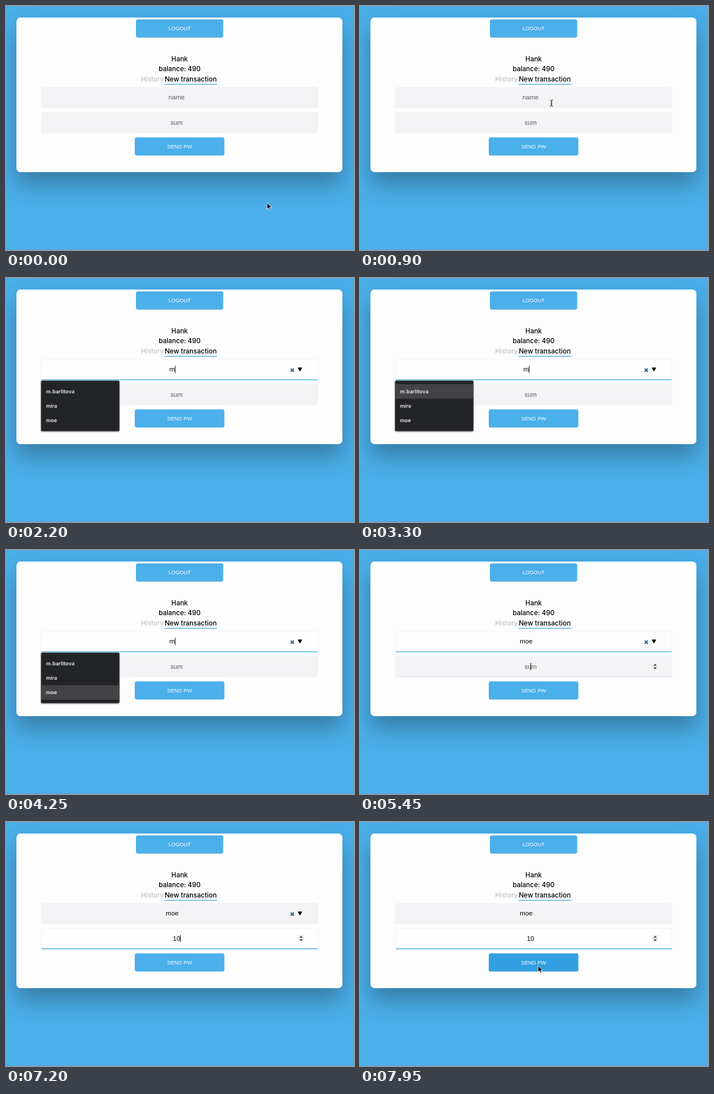
An HTML page for the animation above (8000 ms loop, 600 px wide and 423 px high).

```html
<!DOCTYPE html>
<html lang="en">
<head>
<meta charset="utf-8">
<title>New transaction</title>
<style>
  html, body { margin: 0; width: 100%; height: 100%; overflow: hidden; background: #4bafea; }
  #card {
    position: absolute; left: 18px; top: 20px; width: 562px; height: 267.5px;
    border-radius: 7px; background: #fefdfe; box-shadow: 0 21px 42px rgba(0, 0, 0, .3);
  }
  svg { position: absolute; left: 0; top: 0; }
  text { text-anchor: middle; }
  .head { font: 500 11.5px Poppins, Inter, sans-serif; }
  .field { font: 11.2px "Liberation Sans", Arial, sans-serif; }
  .btn { font: 9.2px "Liberation Sans", Arial, sans-serif; fill: #fff; }
  .item { font: 600 9px Inter, sans-serif; fill: #ececee; text-anchor: start; }
</style>
</head>
<body>
<div id="card"></div>
<svg width="600" height="423" viewBox="0 0 600 423">
  <rect x="224" y="23.3" width="150.5" height="31.5" rx="3.5" fill="#4bafea"/>
  <text class="btn" x="299.3" y="42.2">LOGOUT</text>

  <g class="head">
    <text x="299.3" y="95.5">Hank</text>
    <text x="299.3" y="113">balance: 490</text>
    <text x="272" y="131" style="text-anchor:end;font-weight:400" fill="#bbb9bd">History</text>
    <text x="318.5" y="131">New transaction</text>
  </g>
  <rect x="272.7" y="135" width="91.5" height="1.4" fill="#4bafea"/>

  <g id="name" class="field">
    <rect x="61" y="141" width="476.8" height="36" rx="3.5" stroke="#f2f1f3"/>
    <rect x="61.5" y="175.8" width="476" height="1.5" rx=".7" fill="#4bafea"/>
    <text y="162.3"></text>
    <g class="tools">
      <path d="M490.8 157l5.4 5.6m0-5.6l-5.4 5.6" stroke="#2f628f" stroke-width="2.1"/>
      <path d="M502.8 155.2h8l-4 7z"/>
    </g>
  </g>

  <g id="sum" class="field">
    <rect x="61" y="184.3" width="476.8" height="36" rx="3.5" stroke="#f2f1f3"/>
    <rect x="61.5" y="219.1" width="476" height="1.5" rx=".7" fill="#4bafea"/>
    <text y="206"></text>
    <g class="tools">
      <rect x="503.5" y="195.7" width="10.5" height="12.6" rx="2" fill="#ededee"/>
      <path d="M506 200.6h5.6l-2.8-3.2zM506 203.4h5.6l-2.8 3.2z" fill="#333"/>
    </g>
  </g>

  <rect id="send" x="222" y="227.7" width="154.5" height="31.6" rx="3.5"/>
  <text class="btn" x="299.3" y="246.6">SEND PW</text>

  <rect id="caret" width="1" height="12.5"/>
  <g id="list"></g>

  <g id="mouse">
    <path id="arrow" d="M0 0V11.3L2.6 8.9L4.4 12.9L6.2 12.1L4.5 8.3H8Z" stroke="#fff" stroke-width=".9"/>
    <path id="beam" d="M-2.5-5.5Q0-5.5 0-4V4Q0 5.5-2.5 5.5M2.5-5.5Q0-5.5 0-4V4Q0 5.5 2.5 5.5M-1.2 1.5h2.4" fill="none" stroke="#222" stroke-width="1"/>
  </g>
</svg>
<script>
const LOOP = 8000, CLICK = 1030, OPEN = 1150, TYPE = 2050, PICK = 4350, TAB = 5330,
      ONE = 6750, TEN = 7000, LEAVE = 7480;
const ALL = ['samuelpod', 'tina', 'Руслан', 'boris', 'moe', 'zortia'];
const MATCHES = ['m.barlitova', 'mira', 'moe'];
const ROW = 25.2;

const $ = id => document.getElementById(id);
const clamp = v => v < 0 ? 0 : v > 1 ? 1 : v;
const ease = p => p < .5 ? 2 * p * p : 1 - 2 * (1 - p) ** 2;
const ramp = (t, from, ms) => ease(clamp((t - from) / ms));
const mix = (a, b, p) => `rgb(${a.map((v, i) => Math.round(v + (b[i] - v) * p))})`;
const show = (el, on) => el.style.display = on ? '' : 'none';

function drawField(id, hint, value, centre, focus, tools) {
  const [box, line] = $(id).children, label = $(id).querySelector('text');
  box.setAttribute('fill', mix([243, 242, 244], [255, 254, 255], focus));
  line.setAttribute('opacity', focus);
  label.textContent = value || hint;
  label.setAttribute('x', centre);
  label.setAttribute('fill', value ? '#000' : '#5e5d60');
  show($(id).querySelector('.tools'), tools);
  return value ? centre + label.getComputedTextLength() / 2 : 294;
}

let listKey;
function drawList(items, active) {
  const key = items + '|' + active;
  if (key === listKey) return;
  listKey = key;
  $('list').innerHTML = !items.length ? '' :
    `<rect x="60.4" y="178" width="135" height="${items.length * ROW + 11.8}" rx="2" fill="#232427"
      stroke="#55575b" stroke-width=".6" style="filter:drop-shadow(0 1px 1px #0006)"/>` +
    items.map((s, i) => (i === active
      ? `<rect x="60.7" y="${184 + i * ROW}" width="134.4" height="${ROW}" fill="#434345"/>` : '') +
      `<text class="item" x="69" y="${199.6 + i * ROW}">${s}</text>`).join('');
}

function mouseAt(t) {
  const a = ramp(t, 50, 880), b = ramp(t, LEAVE, 330);
  return [450 - 120 * a - 23 * b, 341 - 173 * a + 81 * b];
}

function draw(t) {
  const [mx, my] = mouseAt(t);
  const overName = my > 141 && my < 177.5, overSum = my > 184 && my < 220.5;

  const name = t < TYPE ? '' : t < PICK ? 'm' : 'moe';
  const sum = t < ONE ? '' : t < TEN ? '1' : '10';
  const onSum = t >= TAB;
  const nameEnd = drawField('name', 'name', name, name ? 286.5 : 294,
    ramp(t, CLICK, 500) - ramp(t, TAB, 500), name && (overName || !onSum));
  const sumEnd = drawField('sum', 'sum', sum, 294, ramp(t, TAB, 500), onSum || overSum);

  // the caret blink restarts on every click or key
  const reset = [CLICK, TYPE, TAB, ONE, TEN].filter(v => v <= t).pop();
  show($('caret'), reset !== undefined && Math.floor((t - reset) / 500) % 2 === 0);
  $('caret').setAttribute('x', onSum ? sumEnd : nameEnd);
  $('caret').setAttribute('y', onSum ? 195.8 : 152.3);

  const items = t < OPEN || t >= PICK ? [] : t < TYPE ? ALL : MATCHES;
  drawList(items, [3100, 3350, 3550].filter(v => v <= t).length - 1);

  $('send').setAttribute('fill', mix([75, 175, 234], [50, 160, 224], ramp(t, LEAVE + 190, 270)));

  show($('mouse'), t < TYPE || t >= LEAVE);
  $('mouse').setAttribute('transform', `translate(${mx} ${my})`);
  show($('beam'), overName || overSum);
  show($('arrow'), !overName && !overSum);
}

function frame() {
  draw(performance.now() % LOOP);
  requestAnimationFrame(frame);
}
frame();
</script>
</body>
</html>
```
